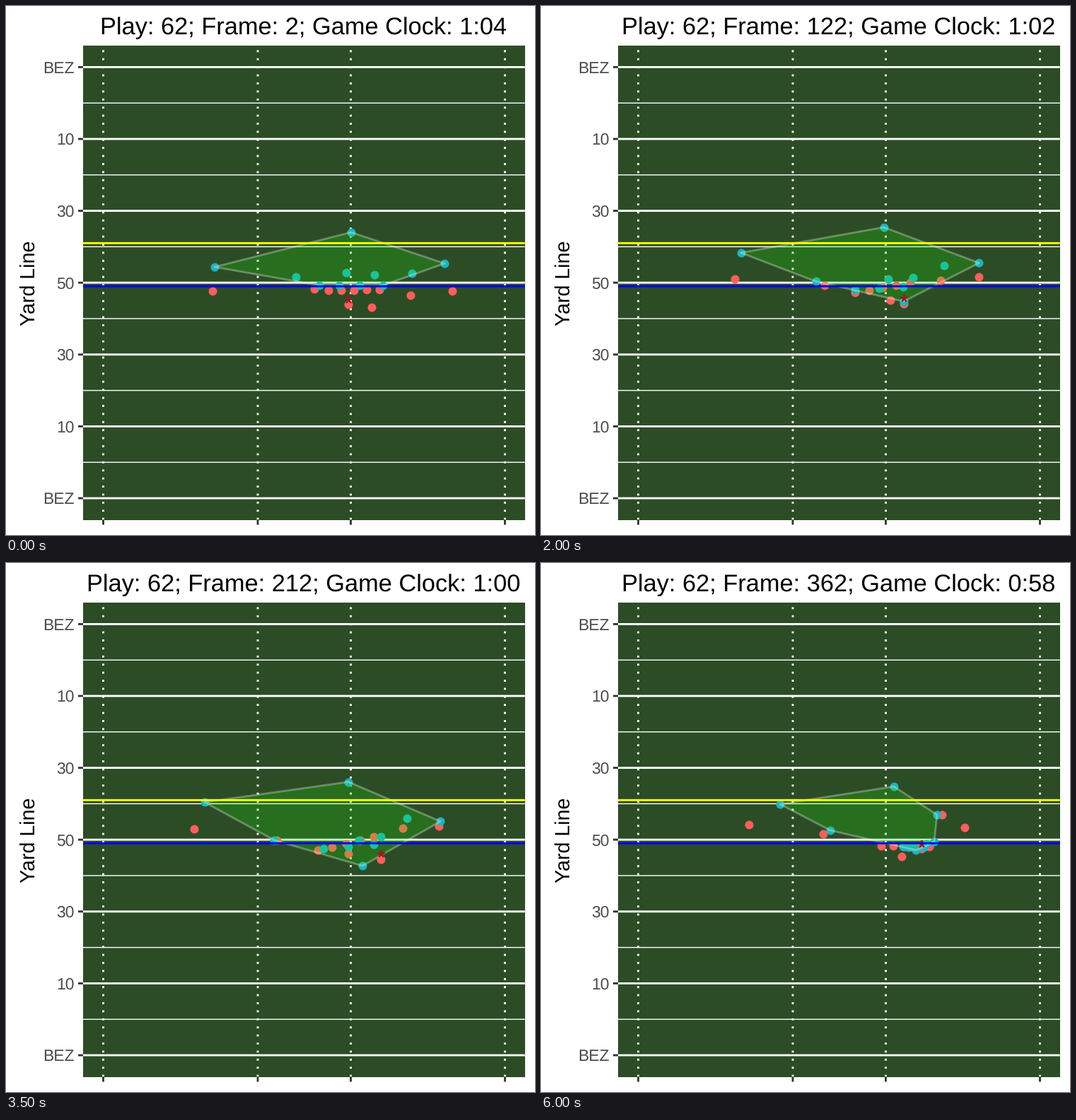
A matplotlib script that plays this animation: 748x748 px, repeating every 6.5 s.

```python
import matplotlib.pyplot as plt
import numpy as np
from matplotlib.animation import FuncAnimation

SIZE, DPI = 748, 64
PT = 72 / DPI  # points per pixel
BASE = 28.6    # base font size in pixels
LEFT, RIGHT, TOP, BOTTOM = 109, 733.7, 56, 726.5

STEPS, INTERVAL = 13, 500
SNAP, TURN, END = 1, 6, 12  # steps at which a route starts, turns and ends


def ease(a, b):
    """Smooth 0-to-1 ramp between steps a and b, one value per step."""
    u = np.clip((np.arange(STEPS) - a) / (b - a), 0, 1)[:, None]
    return u * u * (3 - 2 * u)


def route(start, turn, end):
    """Eased path through three points, shaped (step, axis)."""
    start, turn, end = map(np.array, (start, turn, end))
    return (start + (turn - start) * ease(SNAP, TURN)
            + (end - turn) * ease(TURN, END))


def rank(n, first, last):
    """Routes of n players evenly spaced between two outer routes."""
    a, b = route(*first), route(*last)
    return [a + (b - a) * f for f in np.linspace(0, 1, n)]


def hull(points):
    """Convex hull by monotone chain."""
    pts = sorted(map(tuple, points))

    def half(seq):
        chain = []
        for p in seq:
            while len(chain) > 1:
                (ax, ay), (bx, by) = chain[-2:]
                if (bx - ax) * (p[1] - ay) - (by - ay) * (p[0] - ax) > 0:
                    break
                chain.pop()
            chain.append(p)
        return chain[:-1]

    return half(pts) + half(pts[::-1])


# Offense: line, passer, runner, then receivers from left to right
passer = route((484, 422), (529, 420), (538, 404))
offense = np.stack(rank(5, [(456, 402), (438, 407), (481, 400)],
                        [(528, 401), (518, 386), (549, 401)]) + [
    passer,
    route((517, 426), (482, 411), (510, 415)),
    route((292, 403), (264, 376), (294, 370)),
    route((436, 400), (382, 393), (399, 383)),
    route((572, 409), (561, 377), (567, 356)),
    route((631, 403), (613, 372), (599, 374)),
], axis=1)

# Defense: front, rusher, linebackers, then backs from left to right
defense = np.stack(rank(3, [(443, 395), (444, 404), (512, 401)],
                        [(500, 395), (518, 398), (541, 402)]) + [
    route((533, 395), (502, 430), (530, 406)),
    route((481, 377), (497, 391), (520, 402)),
    route((521, 380), (529, 386), (545, 397)),
    route((295, 369), (276, 338), (338, 341)),
    route((410, 383), (377, 393), (409, 378)),
    route((488, 320), (483, 309), (499, 316)),
    route((574, 378), (568, 361), (560, 356)),
    route((620, 364), (619, 363), (556, 394)),
], axis=1)

ball = passer[:, None] + (0, -7.5)

plt.rcParams["font.family"] = "Liberation Sans"
plt.rcParams["text.hinting"] = "none"
fig = plt.figure(figsize=(SIZE / DPI, SIZE / DPI), dpi=DPI, facecolor="white")
ax = fig.add_axes([0, 0, 1, 1])
ax.set_xlim(0, SIZE)
ax.set_ylim(SIZE, 0)
ax.axis("off")


def line(x, y, color="white", width=2.85, **kw):
    ax.plot(x, y, color=color, lw=width * PT, snap=False,
            solid_capstyle="butt", dash_capstyle="butt", **kw)


def dots(marker, size, color, z, edge=0):
    return ax.plot([], [], ls="none", marker=marker, ms=size * PT, color=color,
                   mew=edge * PT, zorder=z, snap=False)[0]


# Field
ax.add_patch(plt.Rectangle((LEFT, TOP), RIGHT - LEFT, BOTTOM - TOP,
                           fc="#2c4c26", lw=0, zorder=0))
for k, label in enumerate(["BEZ", "10", "30", "50", "30", "10", "BEZ"]):
    y = 86.4 + 101.6 * k
    line([LEFT, RIGHT], [y, y], zorder=1)
    line([LEFT - 7, LEFT], [y, y], "#333333")
    ax.text(96.5, y + 8.2, label, size=0.8 * BASE * PT, color="#4d4d4d",
            ha="right", va="baseline")
    if k < 6:
        line([LEFT, RIGHT], [y + 50.8, y + 50.8], width=1.42, zorder=1)
for x in (137.5, 356, 487.5, 705.5):
    line([x, x], [BOTTOM, TOP], ls=(0, (1, 3)), zorder=1)
    line([x, x], [BOTTOM, BOTTOM + 7], "#333333")
line([LEFT, RIGHT], [335.3, 335.3], "#ffff00", zorder=6)
line([LEFT, RIGHT], [396.3, 396.3], "#0000ff", zorder=6)
ax.text(41, 392, "Yard Line", size=BASE * PT, rotation=90,
        rotation_mode="anchor", ha="center", va="baseline")

# Moving parts
title = ax.text(421, 39.5, "", size=1.2 * BASE * PT, ha="center", va="baseline")
red = dots("o", 12, "#ff605c", 2)
cyan = dots("o", 12, "#20b2be", 3)
zone = ax.add_patch(plt.Polygon([(0, 0)] * 3, closed=True,
                                fc=(0.08, 1, 0, 0.2), ec=(1, 1, 1, 0.3),
                                lw=2.85 * PT, joinstyle="round", zorder=4))
star = dots((5, 2, 0), 11, "#981c20", 5, edge=2)


def draw(step):
    clock = 64 - (step + 1) // 2
    title.set_text(f"Play: 62; Frame: {2 + 30 * step}; "
                   f"Game Clock: {clock // 60}:{clock % 60:02d}")
    for artist, track in ((red, offense), (cyan, defense), (star, ball)):
        artist.set_data(*track[step].T)
    zone.set_xy(hull(defense[step]))
    return title, red, cyan, zone, star


anim = FuncAnimation(fig, draw, frames=STEPS, interval=INTERVAL,
                     repeat=True, repeat_delay=0)
plt.show()
```
